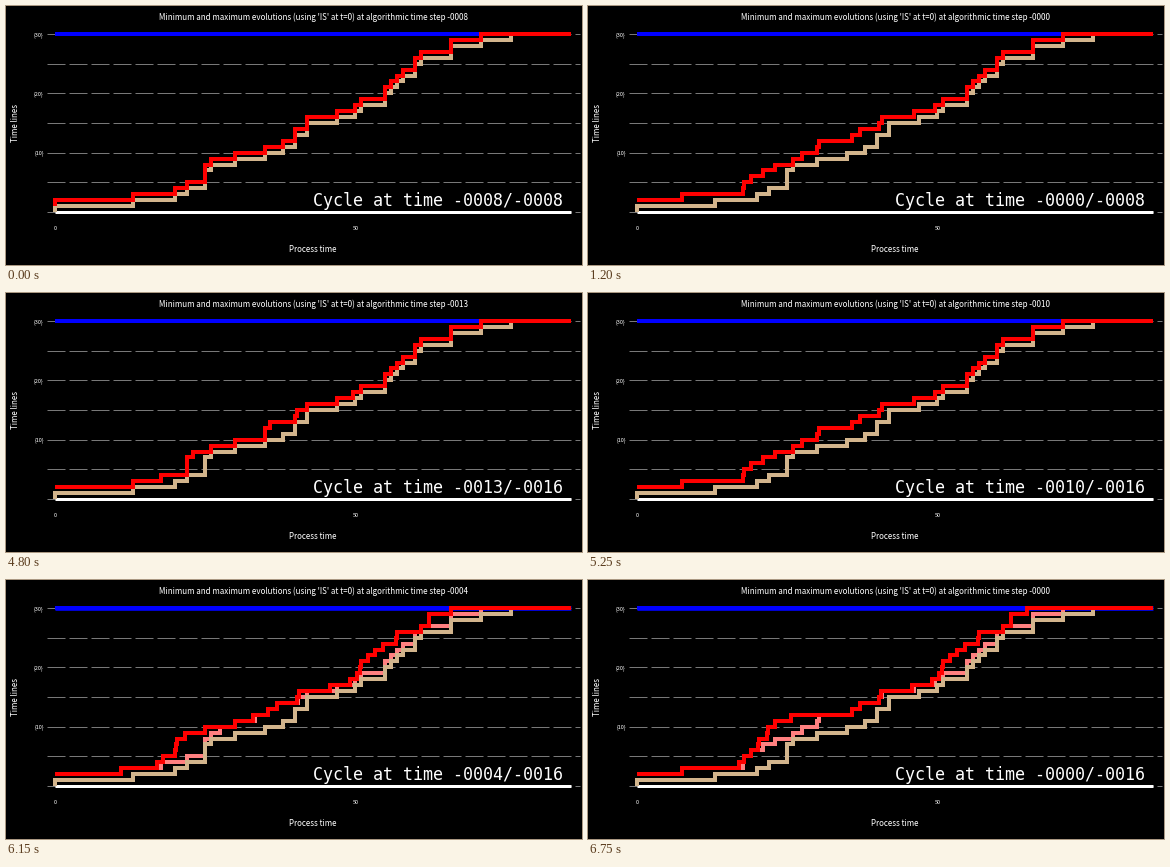
Write a matplotlib script that moves like this. It is 576 px wide and 259 px high and loops after 8000 ms.

```python
import numpy as np
import matplotlib.pyplot as plt
from matplotlib.animation import FuncAnimation

W, H, DPI = 576, 259, 64
PT = 72 / DPI  # points per pixel
TICK, LOOP = 50, 8000
STEP_MS = 150
SECOND_RUN = 4350
END = 86

plt.rcParams["toolbar"] = "None"

# process times at which the lower path climbs by one level
CLIMB = np.array([0, 13, 20, 22, 25, 25, 25, 26, 30, 35, 38, 40, 40, 42, 42,
                  47, 50, 51, 55, 55, 56, 57, 58, 60, 60, 61, 66, 66, 71, 76])
START = CLIMB[1:29]  # upper path, from level 3 up
LEVELS = np.arange(3, 31)


def lead(*points):
    """How much earlier each level is reached, from (level, lead) points."""
    return np.interp(LEVELS, *zip(*points))


REST = np.zeros(len(LEVELS))
EARLY = lead((3, 2), (4, 2.4), (5, 0), (9, 0), (11, 5), (13, 4.5), (16, 0))
SHORT_END = lead((3, 5.5), (4, 2.4), (6, 6), (9, 0), (12, 7.6), (13, 4.2),
                 (15, 1.6), (19, 0))
LONG_END = lead((3, 2), (6, 5), (9, 4.4), (11, 12), (12, 12.4), (13, 4.2),
                (15, 1.6), (19, 0.6), (20, 4.2), (26, 3), (27, 0), (28, 3.7),
                (30, 6))

SHORT = {-8: REST, -4: EARLY, 0: SHORT_END}
LONG = {-16: REST, -10: SHORT_END, -4: np.minimum(LONG_END, 5), 0: LONG_END}


def path_at(run, step):
    """Each level jumps to its next time at its own random step."""
    a = max(k for k in run if k <= step)
    b = min(k for k in run if k >= step)
    jump = np.random.default_rng(7 - b).random(len(LEVELS))
    done = (step - a) / max(b - a, 1) >= jump
    return np.maximum.accumulate(START - np.where(done, run[b], run[a]))


def px(t):
    return 49 + 6 * np.asarray(t, float)


def py(level):
    return 206 - np.asarray(level, float) * 178 / 30


def stairs(times, base):
    """Staircase rising one level at each time, from base to the end."""
    x = np.concatenate([[0], np.repeat(times, 2), [END]])
    y = base + np.repeat(np.arange(len(times) + 1), 2)
    return px(x), py(y)


def upper(times, fresh):
    return stairs(np.append(0, times), 1) if fresh else stairs(times, 2)


fig = plt.figure(figsize=(W / DPI, H / DPI), dpi=DPI, facecolor="black")
ax = fig.add_axes([0, 0, 1, 1])
ax.set_xlim(0, W)
ax.set_ylim(H, 0)
ax.axis("off")


def line(x, y, color, width, z):
    return ax.plot(x, y, color=color, lw=width * PT, zorder=z,
                   solid_capstyle="butt", solid_joinstyle="miter")[0]


def label(x, y, text, size, font="Noto Sans CJK JP", **kw):
    opts = dict(ha="center", va="baseline", color="white", zorder=9)
    return ax.text(x, y, text, fontsize=size * PT, family=font,
                   **{**opts, **kw})


for level in range(0, 31, 5):
    ax.plot([41, 574], [py(level)] * 2, color="#787878", lw=PT, zorder=1,
            dashes=(18, 4), dash_capstyle="butt")
for level in (10, 20, 30):
    label(38, py(level) + 2, "{%d}" % level, 5.5, ha="right")
for t in (0, 50):
    label(px(t) + 0.5, 224, str(t), 5.5)

label(307, 246, "Process time", 8)
label(9.5, 116.5, "Time lines", 8, rotation=90, va="center")
title = label(307.5, 14.4, "", 8.05)
cycle = label(307, 200.5, "", 16.6, "DejaVu Sans Mono", ha="left")

ends = px([0, END])
line(ends, py([30, 30]), "blue", 4, 2)
line(ends, py([0, 0]), "white", 3, 2)
line(*stairs(CLIMB, 0), "tan", 4, 4)
red = line([], [], "red", 4, 5)

# the shorter run, shown behind the longer one
ghost = line([], [], "#ff8080", 4, 3)
ghost_top = line(ends, py([30, 30]), "#0000d0", 5, 1.5)


def update(i):
    ms = i * TICK
    second = ms >= SECOND_RUN
    first = -16 if second else -8
    step = min(0, first + (ms - second * SECOND_RUN) // STEP_MS)

    times = path_at(LONG if second else SHORT, step)
    shadow = second and step >= -8
    if shadow:
        old = path_at(SHORT, step)
        ghost.set_data(*upper(old, step == -8))
        times = np.minimum(times, old)
    for part in (ghost, ghost_top):
        part.set_visible(shadow)
    red.set_data(*upper(times, step == first))

    now = f"-{-step:04d}"
    title.set_text("Minimum and maximum evolutions (using 'IS' at t=0) "
                   f"at algorithmic time step {now}")
    cycle.set_text(f"Cycle at time {now}/-{-first:04d}")
    return ghost, ghost_top, red, title, cycle


anim = FuncAnimation(fig, update, frames=LOOP // TICK, interval=TICK,
                     repeat=True, repeat_delay=0, blit=False)
plt.show()
```
